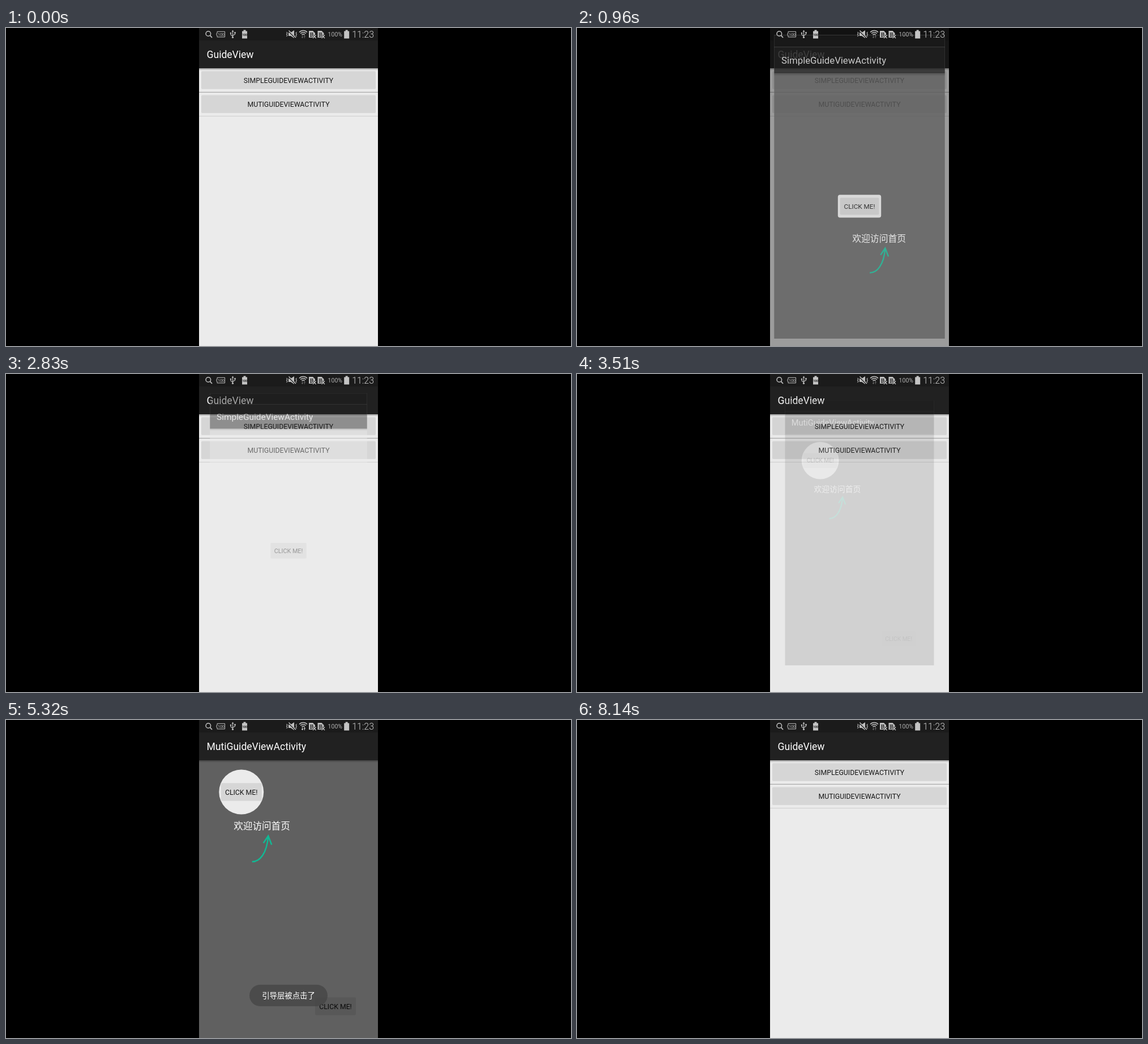
Animation, 998 px wide and 561 px high, one loop 9.11 s. Source, as an HTML page:

```html
<!DOCTYPE html>
<html lang="en">
<head>
<meta charset="utf-8">
<title>GuideView demo</title>
<style>
  html, body { margin: 0; width: 100%; height: 100%; overflow: hidden; background: #000; }
  svg { display: block; width: 100vw; height: 100vh; }
  text { font-family: Roboto, sans-serif; }
  .title { font-size: 17.56px; fill: #fff; }
  .label { font-size: 12.29px; fill: #151515; text-anchor: middle; }
  .cjk { font-family: "Noto Sans CJK SC", "Noto Sans CJK", sans-serif; fill: #fff; text-anchor: middle; }
  .line { fill: none; stroke: #bfbfbf; }
</style>
</head>
<body>
<svg viewBox="0 0 998 561">
  <defs>
    <clipPath id="phone"><rect x="341" width="316" height="561"/></clipPath>
    <linearGradient id="shade" x2="0" y2="1">
      <stop stop-color="#000" stop-opacity=".32"/>
      <stop offset="1" stop-color="#000" stop-opacity="0"/>
    </linearGradient>
    <g id="sim">
      <path d="M535 5h7l4 4v4l-2 4h-9z" fill="#bfbfbf"/>
      <path d="M537 9h6M537 12h6M537 15h4M538.5 8v8M541.5 8v6" stroke="#222" fill="none"/>
      <path d="M542 12.5l5.5 5.5m0-5.5l-5.5 5.5" stroke="#1b1b1b" stroke-width="3"/>
      <path d="M542 12.5l5.5 5.5m0-5.5l-5.5 5.5" stroke="#d0d0d0" stroke-width="1.2"/>
    </g>
    <path id="battery" d="M0 2h2.5V0h4v2H9v13H0z" fill="#c4c4c4"/>
  </defs>
  <rect width="998" height="561"/>
  <g clip-path="url(#phone)">
    <g id="list"></g>
    <rect id="dim" x="341" width="316" height="561"/>
    <g id="simple"></g>
    <g id="muti"></g>
    <g id="toast">
      <rect x="430" y="467" width="138" height="38" rx="19" fill="#464646" fill-opacity=".78"/>
      <text class="cjk" x="499" y="491.2" font-size="13.4">引导层被点击了</text>
    </g>
  </g>

  <g id="status">
    <g class="line">
      <circle cx="357.3" cy="10" r="4.3" stroke-width="1.5"/>
      <path d="M360.4 13.2l3.6 3.8" stroke-width="1.8"/>
      <path d="M374 6.3h12.5v9.6H373v-3h-1v-3.5h1V6.3z"/>
      <path d="M400.5 6v11M397 9v3l3.5 2.5M404.5 8v3l-4 2.5" stroke-width="1.2"/>
      <path d="M495.5 7l1.5 2-1.5 2 1.5 2-1.5 2M513.500 7l-1.500 2 1.500 2-1.500 2 1.500 2" stroke-width="1.1"/>
      <path d="M518 7.500a9.500 9.500 0 0 1 14 0M520.200 9.800a6.500 6.500 0 0 1 9.600 0M522.400 12a3.600 3.600 0 0 1 5.200 0" stroke-width="1.5"/>
      <path id="traffic" d="M523.500 13v4.500m-1.600-1.600l1.600 1.700 1.600-1.700M527.300 18v-4.500m-1.600 1.600l1.600-1.700 1.600 1.700"/>
    </g>
    <g fill="#bfbfbf">
      <path d="M400.500 3.500l2 3h-4z"/>
      <circle cx="400.500" cy="16.500" r="1.600"/>
      <circle cx="397" cy="9" r="1.300"/>
      <path d="M403.300 7h2.400v2.400h-2.400zM499 8h4l6-4v14l-6-4h-4z"/>
    </g>
    <path d="M498.500 4.500l13 13" stroke="#1b1b1b" stroke-width="2.600"/>
    <path d="M499.500 4.500l12.500 12.500" stroke="#d0d0d0" stroke-width="1.300"/>
    <use href="#battery" x="417" y="3.500"/>
    <use href="#battery" x="597.200" y="3.500"/>
    <use href="#sim"/>
    <use href="#sim" x="15.500"/>
    <text x="379.900" y="13.800" font-size="7" text-anchor="middle" fill="#c4c4c4">100</text>
    <text x="421.500" y="14" font-size="5" font-weight="700" text-anchor="middle" fill="#1b1b1b">100</text>
    <text x="568.600" y="14.900" font-size="10.500" fill="#b0b0b0">100%</text>
    <text x="611.200" y="16.700" font-size="16" font-weight="300" fill="#d0d0d0">11:23</text>
  </g>
</svg>
<script>
const $ = id => document.getElementById(id);
const LOOP = 9110;
const OPEN_SIMPLE = 620, HIDE_SIMPLE_GUIDE = 1640, CLOSE_SIMPLE = 2700, SIMPLE_GONE = 3050;
const OPEN_MUTI = 3280, SHOW_TOAST = 4600, NEXT_GUIDE = 5660, HIDE_MUTI_GUIDE = 6790;
const CLOSE_MUTI = 7830, MUTI_GONE = 8140;

const page = title => `
  <rect x="341" width="316" height="561" fill="#ebebeb"/>
  <rect x="341" y="71" width="316" height="4" fill="url(#shade)"/>
  <rect x="341" width="316" height="22" fill="#1b1b1b"/>
  <rect x="341" y="22" width="316" height="49" fill="#212121"/>
  <text class="title" x="354.5" y="53.2">${title}</text>`;

const button = (cx, cy, width, label, pressId = '') => {
  const box = `x="${cx - width / 2}" y="${cy - 15.7}" width="${width}" height="31.4" rx="1.8"`;
  return `<rect ${box} fill="#d6d6d6"/>
    ${pressId && `<rect id="${pressId}" ${box}/>`}
    <text class="label" x="${cx}" y="${cy + 4.5}">${label}</text>`;
};

const circleHole = (cx, cy, r) =>
  `M${cx - r} ${cy}a${r} ${r} 0 1 0 ${2 * r} 0a${r} ${r} 0 1 0 ${-2 * r} 0z`;

// Caption and arrow sit at an offset from (x, y), the centre of the highlighted view.
const guide = (id, hole, x, y) => `<g id="${id}">
  <path d="M341 71h316v490h-316z${hole}" fill-rule="evenodd" fill-opacity=".59"/>
  <g transform="translate(${x} ${y})">
    <text class="cjk" x="36.3" y="66" font-size="16.6">欢迎访问首页</text>
    <path d="M19 123C33 123 45 108 47.500 78M39 90L47.500 77.500L53.500 93"
      fill="none" stroke="#12b894" stroke-width="2.500"/>
  </g></g>`;

$('list').innerHTML = page('GuideView')
  + button(499, 92, 308, 'SIMPLEGUIDEVIEWACTIVITY', 'pressSimple')
  + button(499, 134.3, 308, 'MUTIGUIDEVIEWACTIVITY', 'pressMuti')
  + `<path d="M341 113.300h316" stroke="#999"/><path d="M341 155.500h316" stroke="#cfcfcf"/>`;

$('simple').innerHTML = page('SimpleGuideViewActivity')
  + button(499, 316, 72, 'CLICK ME!')
  + guide('simpleGuide', 'M463 295h72q4 0 4 4v34q0 4-4 4h-72q-4 0-4-4v-34q0-4 4-4z', 499, 316);

$('muti').innerHTML = page('MutiGuideViewActivity')
  + button(415.7, 127, 72, 'CLICK ME!')
  + button(582, 505, 72, 'CLICK ME!')
  + guide('firstGuide', circleHole(415.7, 127, 39.5), 415.7, 127)
  + guide('secondGuide', circleHole(582, 505, 39.5), 510, 332);

const clamp = v => Math.min(1, Math.max(0, v));
const show = (id, visible) => $(id).setAttribute('visibility', visible ? 'inherit' : 'hidden');
const fade = (id, opacity) => $(id).setAttribute('opacity', opacity);

const opening = (t, tap) => 1 - (1 - clamp((t - tap - 212) / 330)) ** 3;
const closing = (t, from, to) => (1 - clamp((t - from) / (to - from))) ** 2;
const press = (t, tap) => 0.05 * Math.sin(Math.PI * clamp((t - tap) / 240));

function placePage(id, amount) {
  const scale = 0.8 + 0.2 * amount;
  show(id, amount > 0);
  fade(id, amount);
  $(id).setAttribute('transform', `translate(499 280.5) scale(${scale}) translate(-499 -280.5)`);
}

function draw(t) {
  const simpleIn = opening(t, OPEN_SIMPLE), mutiIn = opening(t, OPEN_MUTI);
  placePage('simple', simpleIn * closing(t, CLOSE_SIMPLE, SIMPLE_GONE));
  placePage('muti', mutiIn * closing(t, CLOSE_MUTI, MUTI_GONE));

  // The list darkens only while a page opens above it.
  const cover = t < HIDE_SIMPLE_GUIDE ? simpleIn : t < HIDE_MUTI_GUIDE ? mutiIn : 0;
  fade('dim', 0.54 * clamp(cover - 0.15));
  if (t >= HIDE_SIMPLE_GUIDE && t < OPEN_MUTI) fade('dim', 0);

  fade('pressSimple', press(t, OPEN_SIMPLE));
  fade('pressMuti', press(t, OPEN_MUTI));
  show('simpleGuide', t < HIDE_SIMPLE_GUIDE);
  show('firstGuide', t < NEXT_GUIDE);
  show('secondGuide', t >= NEXT_GUIDE && t < HIDE_MUTI_GUIDE);
  fade('toast', clamp((t - SHOW_TOAST) / 550) * (1 - clamp((t - NEXT_GUIDE) / 600)));
  $('traffic').setAttribute('stroke', t >= 4900 && t < 5800 ? '#e0e0e0' : '#666');
}

const start = performance.now();
function tick() {
  draw((performance.now() - start) % LOOP);
  requestAnimationFrame(tick);
}
tick();
</script>
</body>
</html>
```
